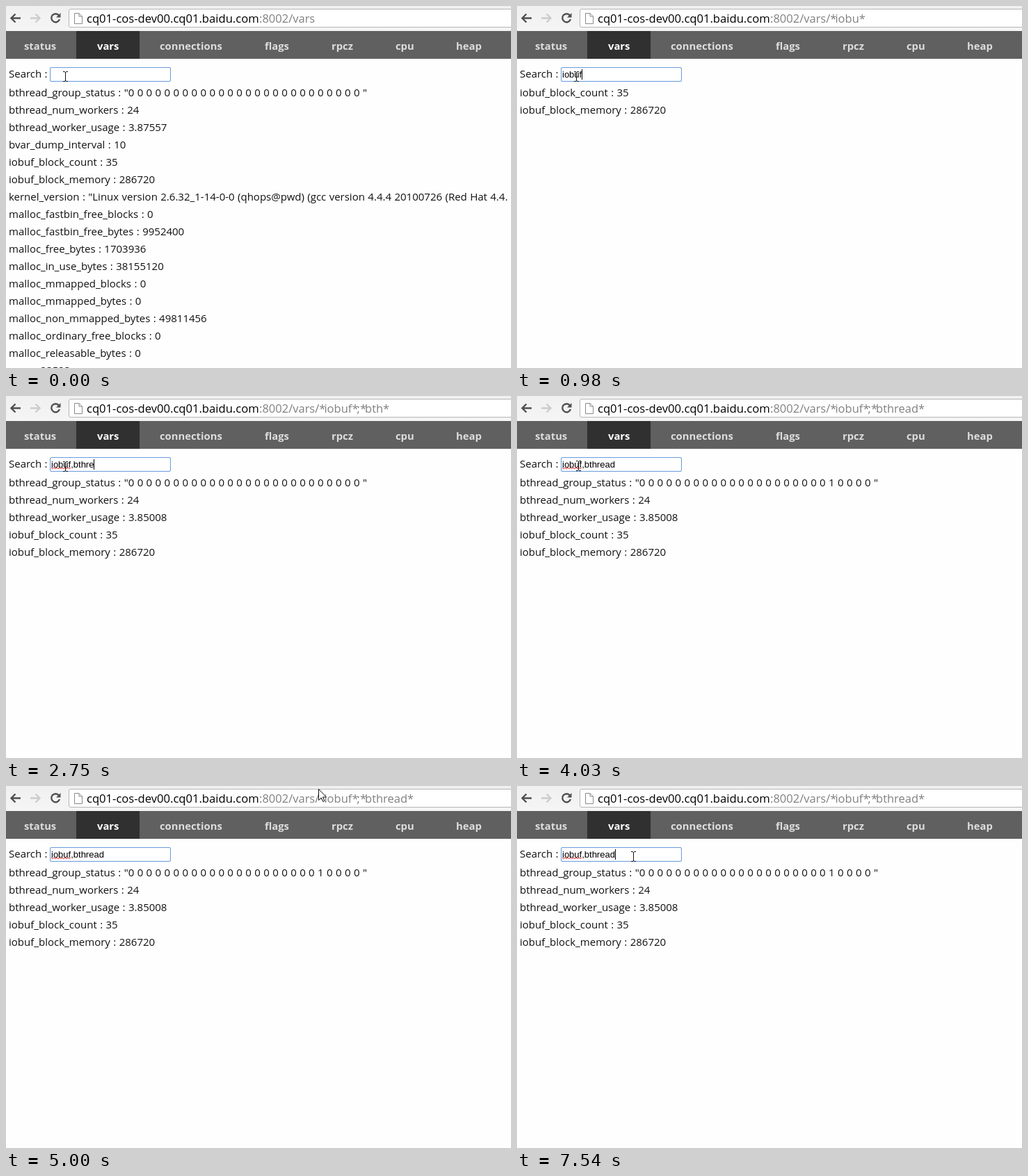
An HTML page that plays this animation: 726 px wide and 521 px high, repeating every 8000 ms.

```html
<!DOCTYPE html>
<html lang="en">
<head>
<meta charset="utf-8">
<style>
  html, body { margin: 0; width: 100%; height: 100%; overflow: hidden; }
  body { position: relative; background: #fefefe; color: #111; font: 15px/25px "Open Sans", sans-serif; word-spacing: .5px; }
  body > *, nav span { position: absolute; white-space: pre; }
  #toolbar { inset: 0 0 auto; height: 36px; background: linear-gradient(#f0f0f0, #f5f5f5); }
  #omnibox { left: 90px; top: 4px; width: 650px; height: 25px; background: #fff; border: 1px solid #b5b5b5; border-radius: 3px; }
  .url { top: 5px; font-size: 16.6px; color: #000; }
  #path { left: 364px; font-size: 16.5px; color: #808080; }
  #path i { font-style: normal; margin-right: -2px; }
  nav { left: 0; top: 36px; width: 100%; height: 40px; background: #606060; color: #ddd; font-weight: bold; font-size: 14.8px; }
  nav span { top: 9px; }
  nav .active { top: 0; padding: 9px 0 6px 30px; width: 61px; margin-left: -30px; background: #303030; color: #fff; }
  #label { left: 4px; top: 85px; }
  #input { left: 63px; top: 88px; width: 172px; height: 19px; border: 1px solid #6f9fdc; border-radius: 2px; box-shadow: inset 0 0 1px #6f9fdc; background: #fff; }
  #query { left: 65px; top: 91px; height: 15px; font: 13px/15px "Liberation Sans", Arial, sans-serif; color: #000; }
  #caret { display: inline-block; width: 1px; height: 15px; background: #000; vertical-align: top; }
  #list { left: 4px; top: 112px; }
  svg { left: 0; top: 0; overflow: visible; fill: none; }
</style>
</head>
<body>
<div id="toolbar"></div>
<div id="omnibox"></div>
<div class="url" style="left:116px">cq01-cos-dev00.cq01.baidu.com</div>
<div class="url" id="path"></div>
<nav></nav>
<div id="label">Search :</div>
<div id="input"></div>
<div id="query"><span id="typed"></span><span id="caret"></span></div>
<div id="list"></div>
<svg width="726" height="521">
  <g stroke-width="2.4">
    <path stroke="#505050" d="M21 17.5H8M13.5 11.5L7.5 17.5L13.5 23.5"/>
    <path stroke="#ccc" d="M35 17.5H48M42.5 11.5L48.5 17.5L42.5 23.5"/>
    <path stroke="#505050" d="M76 13.5A6 6 0 1 0 77 19"/>
    <path fill="#505050" d="M78.5 10V16.5H72Z"/>
  </g>
  <path stroke="#8a8a8a" fill="#fff" d="M98.5 10.5H105L109.5 15V25.5H98.5ZM105 10.5V15H109.5"/>
  <path id="squiggle" stroke="#e33"/>
  <path id="ibeam" stroke="#111" d="M-3 -6.5H-1L0.5 -5.5L2 -6.5H4M0.5 -5.5V6.5M-3 7.5H-1L0.5 6.5L2 7.5H4"/>
  <path id="arrow" stroke="#111" fill="#fff" d="M.5 .5V16.5L4.2 13L6.8 18.5L9 17.5L6.5 12H11.5Z"/>
</svg>
<script>
const LOOP = 8000, POINTER_STEP = 138, BLINK = 500;
const $ = id => document.getElementById(id);

const tabs = { status: 26, vars: 131, connections: 221, flags: 372, rpcz: 468, cpu: 560, heap: 647 };
document.querySelector('nav').innerHTML = Object.entries(tabs).map(([name, x]) =>
  `<span class="${name === 'vars' ? 'active' : ''}" style="left:${x}px">${name}</span>`).join('');
$('squiggle').setAttribute('d', 'M65 103' + 'l2 2l2 -2'.repeat(7));

const kernel = 'kernel_version : "Linux version 2.6.32_1-14-0-0 (qhops@pwd) (gcc version 4.4.4 20100726 (Red Hat 4.4.';
const blocks = count => [`iobuf_block_count : ${count}`, `iobuf_block_memory : ${count * 8192}`];
const threads = (usage, busy) => [
  `bthread_group_status : "${Array.from({ length: 26 }, (_, i) => i === busy ? '1 ' : '0 ').join('')}"`,
  'bthread_num_workers : 24',
  `bthread_worker_usage : ${usage}`];

const allVars = [
  ...threads('3.87557'), 'bvar_dump_interval : 10', ...blocks(35), kernel,
  'malloc_fastbin_free_blocks : 0', 'malloc_fastbin_free_bytes : 9952400',
  'malloc_free_bytes : 1703936', 'malloc_in_use_bytes : 38155120',
  'malloc_mmapped_blocks : 0', 'malloc_mmapped_bytes : 0',
  'malloc_non_mmapped_bytes : 49811456', 'malloc_ordinary_free_blocks : 0',
  'malloc_releasable_bytes : 0', 'pgrp : 23523'];
const ioVars = [
  ...blocks(34), kernel,
  'process_io_num_reads_second : 36847', 'process_io_num_writes_second : 23730',
  'process_io_read_second : 14132107', 'process_io_write_second : 8398122',
  'process_priority : 20', 'rpc_compressions : "snappy gzip zlib"',
  'rpc_num_channel_connections : 0', 'rpc_server_8002_num_connections : 5'];
const bothVars = busy => [...threads('3.85008', busy), ...blocks(35)];

const results = [
  { at: 0, path: '', vars: allVars },
  { at: 700, path: '/*io*', vars: ioVars },
  { at: 980, path: '/*iobu*', vars: blocks(35) },
  { at: 1380, path: '/*iobuf*', vars: blocks(34) },
  { at: 2740, path: '/*iobuf*;*bth*', vars: bothVars() },
  { at: 3180, path: '/*iobuf*;*bthread*', vars: bothVars() },
  { at: 3480, path: '/*iobuf*;*bthread*', vars: bothVars(21) }];

const bursts = [
  { keys: 'i', at: 300, gap: 1 },
  { keys: 'obuf', at: 570, gap: 130 },
  { keys: ',', at: 1750, gap: 1 },
  { keys: 'bthread', at: 2150, gap: 147 }];

const typedAt = t => bursts.map(({ keys, at, gap }) =>
  keys.slice(0, Math.max(0, Math.floor((t - at) / gap) + 1))).join('');

// Pointer legs: each bends towards its "via" point, if it has one
const rest = [85, 101];
const legs = [
  { start: 3480, end: 3600, to: [88, 100] },
  { start: 4320, end: 4990, to: [449, 4], via: [330, 112] },
  { start: 4990, end: 6370, to: [572, 25] },
  { start: 6370, end: 6500, to: [628, 24] },
  { start: 6560, end: 7480, to: [167, 101], via: [270, 112] }];

function pointerAt(t) {
  const time = t - (t - 25) % POINTER_STEP;
  let from = rest;
  for (const { start, end, to, via } of legs) {
    if (time < start) break;
    const p = Math.min(1, (time - start) / (end - start));
    const u = via ? p * p * (3 - 2 * p) : p;
    from = from.map((a, i) => {
      const mid = via ? via[i] : (a + to[i]) / 2;
      return Math.round((1 - u) ** 2 * a + 2 * u * (1 - u) * mid + u * u * to[i]);
    });
  }
  return from;
}

const show = (id, on) => $(id).style.visibility = on ? 'visible' : 'hidden';
let shown;

function draw(t) {
  const result = results.findLast(({ at }) => at <= t);
  if (result !== shown) {
    shown = result;
    $('path').innerHTML = (':8002/vars' + result.path).replace(/\*/g, '<i>*</i>');
    $('list').textContent = result.vars.join('\n');
  }
  const typed = typedAt(t);
  $('typed').textContent = typed;
  show('caret', typed && (t < 4000 || Math.floor(t / BLINK) % 2));
  show('squiggle', typed.includes(','));

  const [x, y] = pointerAt(t);
  const overText = (x > 62 && x < 237 && y > 87 && y < 110) || (x > 90 && y > 6 && y < 31);
  show('ibeam', overText);
  show('arrow', !overText);
  for (const id of ['ibeam', 'arrow']) $(id).setAttribute('transform', `translate(${x} ${y})`);
}

function tick() {
  draw(performance.now() % LOOP);
  requestAnimationFrame(tick);
}
tick();
</script>
</body>
</html>
```
